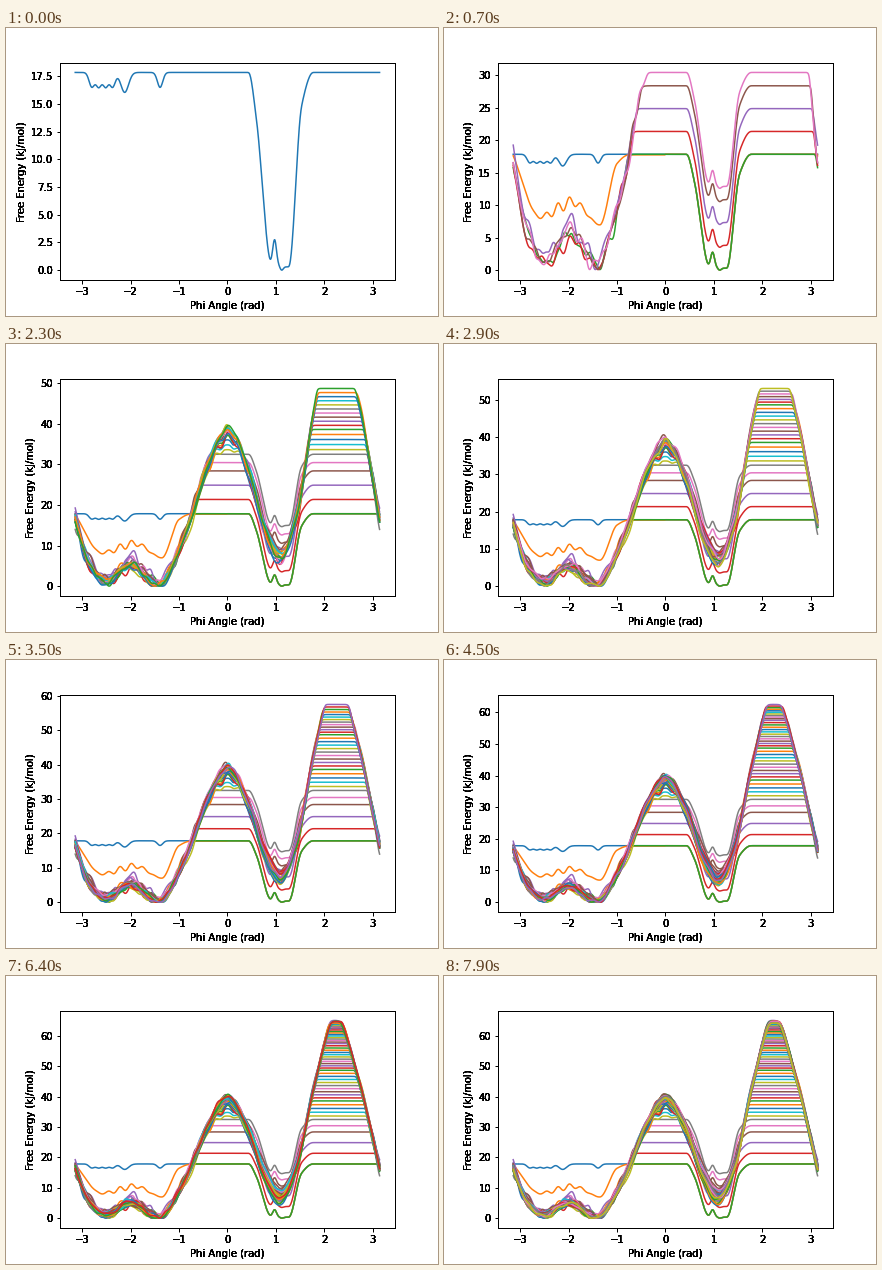
Animation of 432 by 288 pixels, one loop 8 s. Source, as a matplotlib script:

```python
import numpy as np
import matplotlib.pyplot as plt
from matplotlib.animation import FuncAnimation
from matplotlib.text import Text

FRAMES = 80
CURVES = 79
BASE = 17.75
N = 720

plt.rcParams.update({"axes.linewidth": 1, "xtick.major.width": 1,
                     "ytick.major.width": 1})
plain_draw = Text.draw


def heavy_draw(self, renderer):
    """Draw text repeatedly so its soft edges turn solid."""
    for _ in range(8):
        plain_draw(self, renderer)


Text.draw = heavy_draw

x = np.linspace(-np.pi, np.pi, N, endpoint=False)


def smooth(y, s):
    m = np.arange(N // 2 + 1)
    return np.fft.irfft(np.fft.rfft(y) * np.exp(-(s * m) ** 2 / 2), N)


def through(*points):
    """Cubic through the points, level at every turning point."""
    px, py = np.array(points).T
    d = np.diff(py) / np.diff(px)
    a, b = d[:-1], d[1:]
    rising = a * b > 0
    inner = np.where(rising, 2 * a * b / np.where(rising, a + b, 1), 0)
    m = np.concatenate([d[:1], inner, d[-1:]])
    i = np.clip(np.searchsorted(px, x, side="right") - 1, 0, len(d) - 1)
    h = px[i + 1] - px[i]
    t = (x - px[i]) / h
    return (py[i] + (py[i + 1] - py[i]) * t * t * (3 - 2 * t)
            + h * t * (1 - t) * (m[i] * (1 - t) - m[i + 1] * t))


def softmin(a, b, w=0.8):
    return -w * np.logaddexp(-a / w, -b / w)


def bump(c, s):
    return np.exp(-((x - c) / s) ** 2 / 2)


# Converged landscape: two shallow basins, a barrier, a well and a peak
surface = smooth(through(
    (-np.pi, 16.2), (-2.85, 5), (-2.5, 0.9), (-2, 5), (-1.42, 0),
    (-0.9, 11.5), (-0.4, 31), (0, 40), (0.45, 29), (0.75, 15), (1.1, 7),
    (1.42, 16.5), (1.8, 44), (2.24, 66.5), (2.7, 46), (np.pi, 16.2)), 0.03)

# Region carved by the first walk
well = through((-np.pi, BASE), (0.44, BASE), (0.6, 13.5), (0.9, 0.6),
               (1.27, 0.2), (1.53, 14.7), (1.77, BASE), (np.pi, BASE))
well = smooth(well + 2.4 * bump(0.975, 0.035) - 0.4 * bump(1.12, 0.03), 0.015)
well -= well.min()

dips = 1.8 * bump(-2.12, 0.08) + 1.35 * bump(-1.39, 0.055)
dips += sum(1.3 * bump(c, 0.055) for c in np.linspace(-2.8, -2.37, 4))

half_filled = through((-np.pi, 17.6), (-2.6, 8.2), (-1.9, 10.5), (-1.35, 7),
                      (-1, 16.4), (-0.75, BASE), (np.pi, BASE))
half_filled += 0.9 * np.cos(26 * (x + 1.98)) * bump(-2.1, 0.3)


def level(k):
    """Height of the part not yet filled by step k."""
    return np.interp(k, [2, 5, 7, 12, 22, 34, 44, 54],
                     [BASE, 28.3, 32.4, 38.6, 48.7, 57.5, 62.5, 65.1])


def curve(k):
    if k == 0:
        return well - dips
    if k == 1:
        return np.where(x < 0, half_filled, well)
    rng = np.random.default_rng(k + 40)
    top = level(k) - (rng.uniform(0.1, 0.9) if k > 54 else 0)
    early = np.exp(-k / 14)
    noise = smooth(rng.normal(size=N), 0.05)
    f = surface + noise / noise.std() * (0.35 + 0.6 * early)
    f = f + 2.2 * early * np.cos(26 * x) * bump(0, 0.25)
    if k >= 8:
        f = f - 7 * early * bump(0, 0.35)
        f = f + rng.normal(0, 1.1) * bump(0.9, 0.4)
    f = f - f.min()
    if k < 8:
        unfilled = (x > 0.3) & (x < 1.9)
        return softmin(np.where(unfilled, top + 20, f), top) + well - BASE
    f = softmin(f, top)
    return f * top / f.max()


curves = np.array([curve(k) for k in range(CURVES)])
curves = np.hstack([curves, curves[:, :1]])
angle = np.append(x, np.pi)
tops = np.maximum.accumulate(curves.max(axis=1))

fig, ax = plt.subplots(figsize=(6, 4), dpi=72)
fig.subplots_adjust(left=0.125, right=0.9, bottom=0.125, top=0.88)
ax.set_xlabel("Phi Angle (rad)")
ax.set_ylabel("Free Energy (kJ/mol)")
ax.set_xlim(-1.1 * np.pi, 1.1 * np.pi)
lines = [ax.plot(angle, c)[0] for c in curves]


def update(i):
    n = max(1, i)
    for k, line in enumerate(lines):
        line.set_visible(k < n)
    ax.set_ylim(-0.05 * tops[n - 1], 1.05 * tops[n - 1])
    return lines


anim = FuncAnimation(fig, update, frames=FRAMES, interval=100,
                     init_func=lambda: update(0), repeat=True,
                     repeat_delay=0, blit=False)
plt.show()
```
